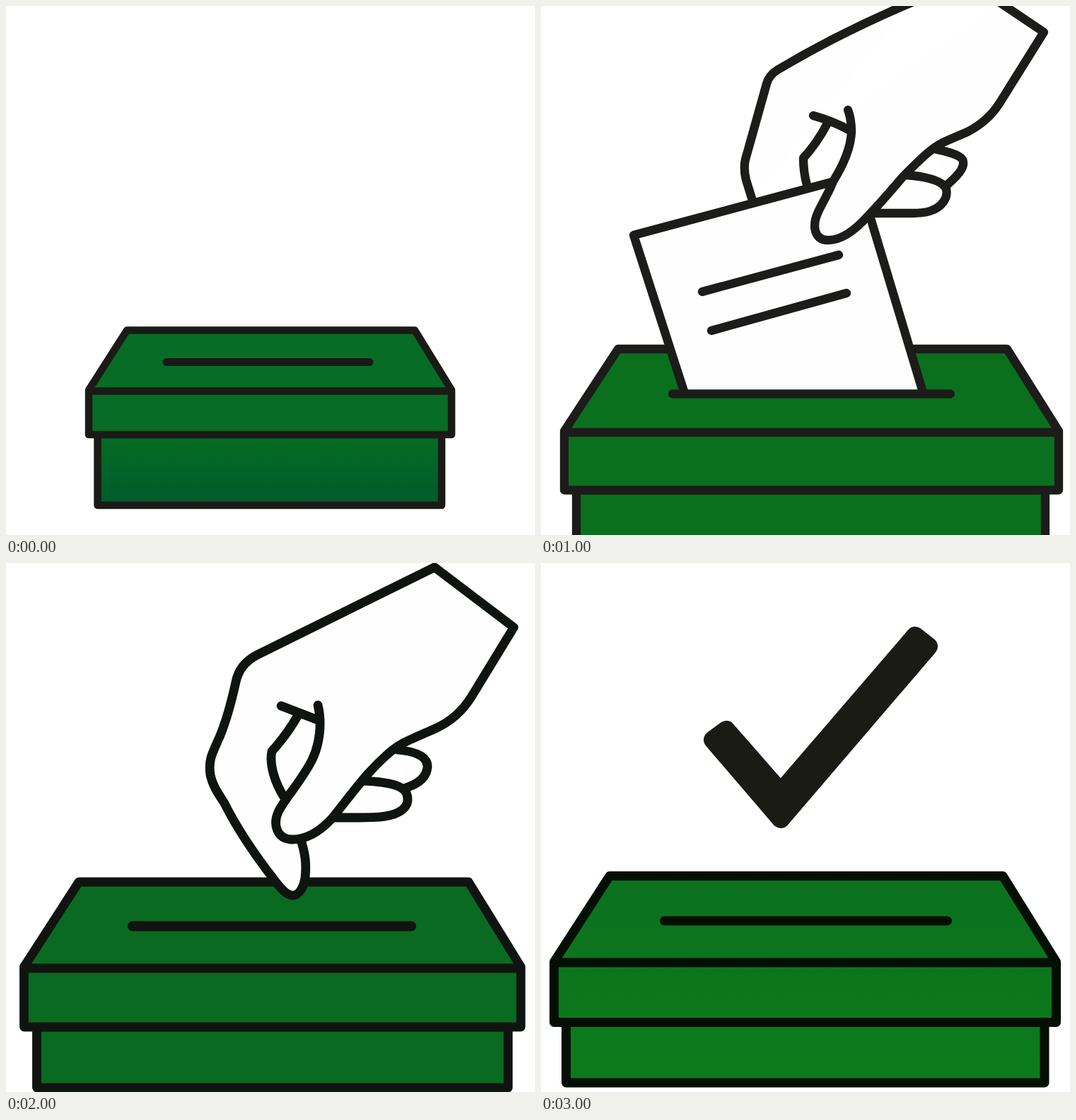
An HTML page without scripts that plays this animation: 748x748 px, repeating every 4000 ms.

```html
<!DOCTYPE html>
<html lang="en">
<head>
<meta charset="utf-8">
<title>Casting a vote</title>
<style>
  html, body { margin: 0; width: 100%; height: 100%; overflow: hidden; background: #fff; }
  svg { display: block; width: 100%; height: 100%; }
  .scene {
    visibility: hidden;
    stroke-linecap: round;
    stroke-linejoin: round;
    animation: show 4s step-end infinite;
  }
  .insert { animation-delay: -3s; }
  .push { animation-delay: -2s; }
  .done { animation-delay: -1s; }
  .white { fill: #fefefe; }
  .line { fill: none; }
  @keyframes show {
    0% { visibility: visible; }
    25%, 100% { visibility: hidden; }
  }
</style>
</head>
<body>
<svg viewBox="0 0 748 748">
  <defs>
    <linearGradient id="shade" x2="0" y2="1">
      <stop offset=".1" stop-color="#056b25"/>
      <stop offset="1" stop-color="#005a2b"/>
    </linearGradient>
    <linearGradient id="glow" gradientUnits="userSpaceOnUse" x1="0" y1="442" x2="0" y2="735">
      <stop offset="0" stop-color="#0b711e"/>
      <stop offset="1" stop-color="#0c7b1b"/>
    </linearGradient>
  </defs>

  <!-- Empty box -->
  <g class="scene" stroke="#1a1a16" stroke-width="10.5" fill="#076c26">
    <path d="M129.5 606H616V706H129.5Z" fill="url(#shade)"/>
    <path d="M117 606V543L171 458.5H578L630 543V606ZM117 544.5H630"/>
    <path d="M227 503.5H514" stroke-width="11"/>
  </g>

  <!-- Ballot going in -->
  <g class="scene insert" stroke="#1c1c1a" stroke-width="12.3" fill="#0a701e">
    <path d="M50 684.5H713V780H50Z"/>
    <path d="M33 684.5V601L109 485H659L732 601V684.5ZM33 603H732"/>
    <path class="white" d="M524 -5C460 22 397 53 335 90Q322 98 319 110L289 217Q286 230 290 246L299 275"/>
    <path class="white" d="M202.5 546L131 324L411 249L463 290L540 546"/>
    <path d="M186 548.5H579"/>
    <path class="line" d="M228 404L421 352M241 459L432 406"/>
    <path class="white" d="M556 202C575 206 591 210 596 217C600 226 594 236 573 254"/>
    <path class="white" d="M515 239C535 240 568 245 573 259C576 272 566 285 550 290Q540 293 525 293H468"/>
    <path class="white" d="M650 -4L711 37L648 138Q632 163 603 178L575 190C555 198 540 213 515 238C497 258 481 278 463 296C440 322 420 332 404 331C386 330 383 310 392 291C398 278 408 262 413 248C428 224 438 200 439 178Q439 160 434 147"/>
    <path class="line" d="M385 155Q411 162 437 176M405 166C394 187 383 202 371 215Q371 235 376 253"/>
  </g>

  <!-- Hand at the slot -->
  <g class="scene push" stroke="#101410" stroke-width="12.8" fill="#0a6a22">
    <path d="M43.5 656H710V742H43.5Z"/>
    <path d="M25.5 656V571L103 451H654L728 571V656ZM25.5 573H728"/>
    <path d="M179 513.5H573" stroke-width="14"/>
    <path class="white" d="M553 264C575 266 596 272 596 288C595 302 584 312 565 318"/>
    <path class="white" d="M504 308C530 309 559 312 566 325C572 340 564 352 542 357Q530 360 500 360H462"/>
    <path class="white" d="M418 395C423 412 425 425 423 445C421 458 415 470 405 470C397 470 388 460 377 445C350 410 325 372 309 340C302 328 293 318 289 300C286 280 290 272 302 246C312 222 318 200 325 168Q330 143 355 130L606 6L718 91L660 186Q640 220 605 235C570 250 555 256 540 270C510 296 490 325 461 361C440 384 420 391 404 391C383 390 377 370 385 352C392 336 418 308 433 278C444 255 447 225 441 201"/>
    <path class="line" d="M389 202L441 222M413 215C400 238 388 253 376 266C372 285 380 310 393 331"/>
  </g>

  <!-- Vote counted -->
  <g class="scene done" stroke="#040f04" stroke-width="13" fill="url(#glow)">
    <path d="M35.5 649.5H712V735H35.5Z"/>
    <path d="M18.5 649.5V564L97 442.5H653L728.5 564V649.5ZM18.5 565H728.5"/>
    <path d="M174.5 506H574.5"/>
    <path d="M262 236L339 324L529 103L548 118L339 362L243 250Z" fill="#1a1b14" stroke="#1a1b14" stroke-width="26"/>
  </g>
</svg>
</body>
</html>
```
